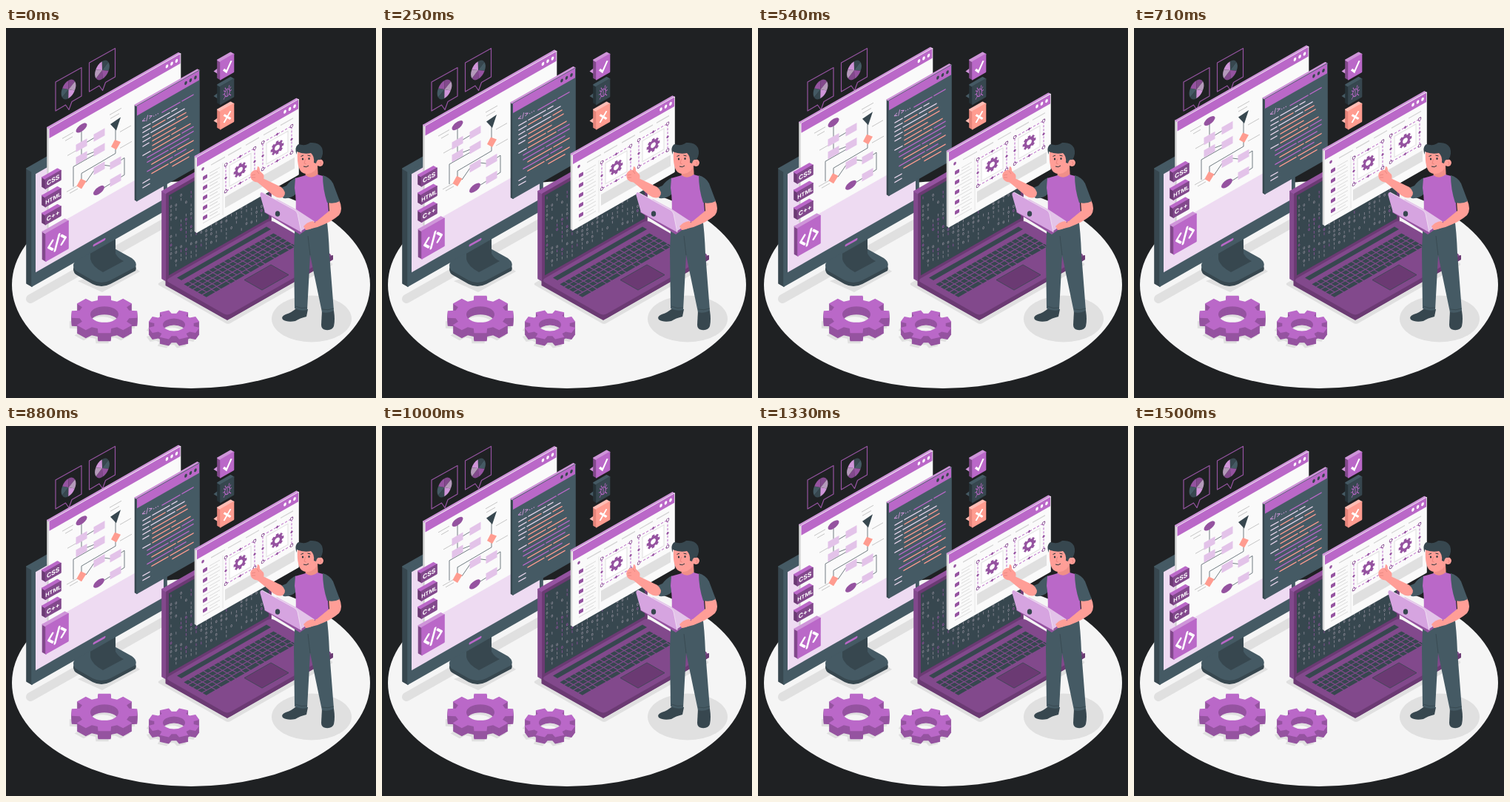
Write an HTML page that moves like this. It is 500 by 500 pixels and loops after 1.54 s.

```html
<!DOCTYPE html>
<html lang="en">
<head>
<meta charset="utf-8">
<title>Developer workspace</title>
<style>
  html, body { margin: 0; height: 100%; overflow: hidden; background: #1f2123; }
  svg { display: block; width: 100vw; height: 100vh; }
  text { font-family: Inter, "Open Sans", sans-serif; font-weight: 700; text-anchor: middle; }
</style>
</head>
<body>
<svg id="stage" viewBox="0 0 500 500"></svg>
<script>
const SLOPE = 0.57;
const PURPLE = '#ba68c8', PLUM = '#82498c', DEEP = '#6b3a73', MAUVE = '#9553a0', ORCHID = '#cf95d9';
const LILAC = '#e3c3e9', PALE = '#eedbf2', SLATE = '#455a64', NIGHT = '#37474f', INK = '#263238';
const SALMON = '#ff9c90', SKIN = '#ff9e97', GREY = '#e0e0e0', WHITE = '#fafafa';

const fill = (d, color, extra = '') => `<path d="${d}" fill="${color}" ${extra}/>`;
const line = (d, color, width = 1, extra = '') =>
  `<path d="${d}" fill="none" stroke="${color}" stroke-width="${width}" ${extra}/>`;
const rect = (x, y, w, h, color, extra = '') =>
  `<rect x="${x}" y="${y}" width="${w}" height="${h}" fill="${color}" ${extra}/>`;
const oval = (x, y, rx, ry, color, extra = '') =>
  `<ellipse cx="${x}" cy="${y}" rx="${rx}" ry="${ry}" fill="${color}" ${extra}/>`;
const text = (x, y, size, str, color = '#fff') =>
  `<text x="${x}" y="${y}" font-size="${size}" fill="${color}">${str}</text>`;
const wall = (x, y, body) => `<g transform="matrix(1 ${-SLOPE} 0 1 ${x} ${y})">${body}</g>`;
const floor = (x, y, body) => `<g transform="matrix(1 ${-SLOPE} 1 ${SLOPE} ${x} ${y})">${body}</g>`;
const float = body => `<g class="float">${body}</g>`;
const each = (list, draw) => list.map(draw).join('');
const range = n => [...Array(n).keys()];

// Upright slab: front face at (x, y), with its left side and top edge showing
function slab(x, y, w, h, depth, [front, side, top], content = '') {
  const rise = depth * SLOPE;
  const round = color => `stroke="${color}" stroke-width="1.6" stroke-linejoin="round"`;
  return fill(`M${x} ${y}l${-depth} ${-rise}v${h}l${depth} ${rise}z`, side, round(side)) +
    fill(`M${x} ${y}l${-depth} ${-rise}l${w} ${-w * SLOPE}l${depth} ${rise}z`, top, round(top)) +
    wall(x, y, rect(0, 0, w, h, front, round(front)) + content);
}

function gearPath(cx, cy, r, hole, squash, twist) {
  const points = [];
  for (let i = 0; i < 8; i++) {
    for (const [turn, size] of [[-.27, .77], [-.19, 1], [.19, 1], [.27, .77]]) {
      const a = i * Math.PI / 4 + turn + twist;
      points.push((cx + r * size * Math.cos(a)).toFixed(1) + ' ' + (cy + r * size * squash * Math.sin(a)).toFixed(1));
    }
  }
  const ry = hole * squash;
  return `M${points.join('L')}ZM${cx - hole} ${cy}a${hole} ${ry} 0 1 0 ${2 * hole} 0a${hole} ${ry} 0 1 0 ${-2 * hole} 0Z`;
}
const gear = (cx, cy, r, hole, color, squash = 1, twist = 0) =>
  fill(gearPath(cx, cy, r, hole, squash, twist), color, 'fill-rule="evenodd"');
function thickGear(cx, cy, r, hole, depth, twist) {
  const layer = (dx, dy, color) => gear(cx + dx, cy + dy, r, hole, color, SLOPE, twist);
  return layer(-3, depth + 3, GREY) + each(range(depth), i => layer(0, depth - i, MAUVE)) + layer(0, 0, PURPLE);
}

const dots = (right, y, color) => each([0, 6.5, 13], d => oval(right - d, y, 1.8, 2.3, color));

function chartBubble(x, y, spin) {
  const colors = [NIGHT, SLATE, MAUVE, PLUM, '#b59abb', ORCHID];
  const at = i => `${(12 * Math.cos(i * 1.047 + spin)).toFixed(1)} ${(12 * Math.sin(i * 1.047 + spin)).toFixed(1)}`;
  const pie = each(colors, (c, i) => fill(`M0 0L${at(i)}A12 12 0 0 1 ${at(i + 1)}Z`, c));
  return line(`M${x} ${y}l35 -19.500v38.500l-13 7.500l-4 11l-4.500 -6.500l-13.500 8z`, MAUVE, 1.2, 'stroke-linejoin="round"') +
    `<g transform="matrix(.82 -.47 0 1 ${x + 17.5} ${y + 10})">${pie}</g>`;
}

function flowWindow() {
  const strokes = [[76, 150, 15], [80, 153, 10], [83, 173, 15], [140, 118, 16], [141, 123, 12],
    [154, 141, 15], [154, 163, 16], [82, 222, 16], [86, 224, 11]];
  const boxes = [[102, 159], [126, 145], [102, 176], [126, 165], [126, 190], [148, 183], [148, 206]];
  return slab(58.5, 136.5, 177, 135, 2.5, [WHITE, '#d5d5d5', ORCHID],
      rect(0, 0, 177, 13, PURPLE) + dots(172, 6.5, '#fff')) +
    each(strokes, ([x, y, n]) => line(`M${x} ${y}l${n} ${-n * SLOPE}`, '#b8b8b8', .8)) +
    line('M102 140V176M109 155L119 149M109 172L119 168M148 135V154M148 164V170L102 197V206M91 215V188L119 172M133 186L141 187M154 180L160 176V199L133 216M108 209L119 193', NIGHT, .7) +
    each(boxes, ([x, y]) => wall(x, y, rect(-7.5, -5, 15, 10, LILAC))) +
    each([[102, 135.5], [125.5, 220]], ([x, y]) => wall(x, y, oval(0, 0, 7.5, 5, MAUVE))) +
    fill('M141 130.500L155 121L149 139z', NIGHT) +
    fill('M142 161L147 151.500L155 154.500L149 165zM95.500 214L101 204L108.500 207.500L102 218z', SALMON);
}

function codeWindow() {
  const ink = { p: PURPLE, w: '#e6d4ea', s: SALMON };
  const rows = ['p 34 58 p 61 76', 'w 8 18 w 21 44 w 47 54', 'w 8 18 s 21 38 w 41 64', 'w 8 16 w 19 51 s 54 66',
    'w 8 18 s 21 68', 'w 8 16 s 21 52', 's 21 44 s 47 72', 'w 8 18 s 21 58 p 61 76', 'p 14 76', 'p 14 42 p 45 70',
    's 20 52 s 55 76', 'p 14 48 p 51 66', 's 20 42 s 45 76', 'w 8 17 s 48 70', 'w 8 17'];
  const code = each(rows, (row, i) => row.replace(/(\w) (\d+) (\d+) ?/g,
    (_, c, from, to) => line(`M${from} ${28 + i * 6.2}H${to}`, ink[c], 1.5, 'stroke-linecap="round"')));
  return slab(177, 106, 84, 128, 2.5, [SLATE, NIGHT, ORCHID],
    rect(0, 0, 84, 13, PURPLE) + dots(79, 6.5, NIGHT) + text(18, 27, 8.5, '&lt;/&gt;…', ORCHID) + code);
}

function designWindow() {
  const panel = (x, y) => {
    const corners = [[0, 0], [39, 0], [0, 36], [39, 36]], mids = [[19.5, 0], [0, 18], [39, 18], [19.5, 36]];
    return `<g transform="translate(${x} ${y})">` +
      rect(5, 4, 29, 28, '#fff', `stroke="${GREY}"`) +
      rect(0, 0, 39, 36, 'none', `stroke="${PURPLE}" stroke-width="1" stroke-dasharray="3 2"`) +
      each(corners, ([u, v]) => oval(u, v, 1.8, 1.8, '#fff', `stroke="${PLUM}" stroke-width=".9"`)) +
      each(mids, ([u, v]) => fill(`M${u - 2} ${v}l2 -2l2 2l-2 2z`, MAUVE)) +
      gear(19.5, 18, 9, 3.4, MAUVE) + '</g>';
  };
  return slab(258, 175.5, 137, 101, 2.5, [WHITE, '#d5d5d5', ORCHID],
    rect(0, 0, 137, 12.5, PURPLE) + dots(132, 6, '#fff') +
    oval(8, 20, 1.8, 2, MAUVE) +
    line('M19 21H38M42 21H60M66 21H84M90 21H108M113 21H130', '#d2d2d2', 1.4) +
    line('M35 27V98', GREY, .7) +
    each(range(5), i => rect(8, 30.5 + i * 13.5, 6, 5, MAUVE, 'rx="1"') +
      line(`M17 ${31 + i * 13.5}H31m-14 4H28M8 ${39.5 + i * 13.5}H31`, '#d2d2d2', .8)) +
    rect(38, 75, 94, 15, GREY) + panel(39, 32) + panel(89, 30.5));
}

function tags() {
  const small = (y, label, size) => slab(53.5, y, 20.5, 12.5, 4.5, [PLUM, DEEP, PURPLE], text(10.2, 9.6, size, label));
  return small(205, 'CSS', 8.5) + small(229.5, 'HTML', 7.2) + small(253.5, 'C++', 8.5) +
    slab(54, 278.5, 30, 37, 4.5, [PURPLE, PLUM, ORCHID],
      line('M9 14.500L3.500 20.500L9 26.500M18 11L12 30M21 14.500L26.500 20.500L21 26.500', '#fff', 3, 'stroke-linecap="round" stroke-linejoin="round"'));
}

function statusIcons() {
  const icon = (y, front, side, top, mark) =>
    fill(`M280.500 ${y + 13}l8 -6v11z`, top) + slab(290, y, 17.5, 24, 4, [front, side, top], mark);
  const bug = line('M4 8L7 11M14 8L11 11M3 13H6M12 13H15M4 20L7 16M14 20L11 16M7 8L6 5M11 8L12 5M9 9V19', PURPLE, .9) +
    oval(9, 13.5, 3.4, 5, 'none', `stroke="${PURPLE}" stroke-width="1"`);
  return icon(45.5, PURPLE, PLUM, ORCHID, line('M4 13L8 18L14.500 7', '#fff', 2.6)) +
    icon(79, NIGHT, INK, SLATE, bug) +
    icon(112.5, SALMON, '#e5847a', '#ffbdb5', line('M4.500 7.500L13.500 18M13.500 7.500L4.500 18', '#fff', 2.4));
}

const monitor = () =>
  line('M33 366L222 259', GREY, 12, 'stroke-linecap="round"') +
  fill('M97 342L130 357L181 329L165 318z', GREY) +
  each([[4, NIGHT], [-1, SLATE]], ([dy, color]) =>
    fill('M91 322Q91 317 99 312L134 292L170 312Q178 318 175 324L141 342Q129 348 117 342L96 330Q91 327 91 322z', color, `transform="translate(0 ${dy})"`)) +
  fill('M114 300L148 282V305Q152 312 159 315L131 330Q116 322 114 312z', NIGHT) +
  slab(35, 194, 182, 155, 7, [SLATE, NIGHT, SLATE],
    rect(5, 6, 173, 133, PALE) + line('M84 147.500H98', PURPLE, 3, 'stroke-linecap="round"'));

function bigLaptop() {
  let seed = 7;
  const random = () => (seed = seed * 16807 % 2147483647) / 2147483647;
  const bits = each(range(19), c => each(range(17), r => {
    const u = 6 + c * 6.8, v = 9 + r * 5.8 + (c % 3) * 2, color = random() < .3 ? MAUVE : '#8f8c99';
    const kind = random();
    if (kind < .4) return '';
    return kind < .6 ? oval(u, v, .9, 1.6, 'none', `stroke="${color}" stroke-width=".7"`) : line(`M${u} ${v - 1.8}v3.600`, color, .7);
  }));
  const keys = each(range(5), i => line(`M8 ${20 + i * 6.3}H129`, NIGHT, 5.2, `stroke-dasharray="${i == 4 ? '12 1.1 5.700 1.100' : '5.700 1.100'}"`));
  return floor(204, 346, rect(0, 0, 143, 96, GREY, 'rx="3"')) +
    slab(217, 224, 141, 118, 6, [DEEP, PLUM, MAUVE], rect(3, 4, 135, 108, NIGHT) + bits) +
    floor(215, 347, rect(0, 0, 143, 84, DEEP, 'rx="5"')) +
    fill('M215.500 342v6L299 395L442 313V307z', DEEP) +
    floor(215, 341, rect(0, 0, 143, 84, PLUM, 'rx="5"') + rect(11, 5, 121, 6, NIGHT) + keys +
      rect(54, 53, 36, 24, DEEP, `stroke="${NIGHT}" stroke-width=".6"`));
}

const developer = () =>
  oval(413, 393, 54, 31.5, GREY) +
  // shoes
  fill('M392 379L408 380L406 390Q397 392 391 396Q380 398 374 394Q371 390 378 387Q387 384 392 379z', NIGHT) +
  fill('M427 382H443Q445 394 443 403Q441 409 432 408Q426 407 426 401z', NIGHT) +
  // trousers
  fill('M391 256H433Q436 276 437 305L443 382Q435 386 427 384L411 307L407 381Q398 383 390 379L389 300z', SLATE) +
  line('M411 307L408 281M391 376Q399 380 407 378M427 380Q435 382 443 379', NIGHT, .8) +
  // raised arm
  fill('M392 202Q384 206 379 213L365 219L375 230Q385 231 392 224z', SLATE) +
  fill('M347 203L372 215Q380 222 375 228Q370 232 361 226L338 207z', SKIN) +
  fill('M331 196Q335 191 339 192L340 187Q343 187 343 193L348 198Q350 204 345 208Q337 210 332 205Q329 200 331 196z', SKIN) +
  line('M332 199L337 198M332 202L337 202M339 193L342 197', '#e37f79', .7) +
  // body and head
  fill('M404 190L421 186L422 205Q412 210 405 203z', '#f08f88') +
  fill('M391 203L405 199Q412 205 421 198L432 201L437 260Q415 268 391 260Q393 233 390 216z', PURPLE) +
  fill('M394 166Q393 181 396 189Q399 198 408 197Q419 195 421 186Q428 189 429 182Q428 176 422 178L421 161z', SKIN) +
  fill('M393 171Q389 162 395 157Q405 160 411 155Q423 154 427 162Q430 170 425 178Q420 177 419 183L416 182Q417 173 412 169Q402 171 393 167z', NIGHT) +
  oval(401, 177, 1.1, 1.5, INK) + oval(409.5, 176.5, 1.1, 1.5, INK) +
  line('M398.500 173.500L402 172M407.500 172L411.500 173M402 187Q406 189 409 186', INK, 1) +
  line('M404.500 177L403 183L405.500 183.500M424 181Q427 181 425 185', '#e37f79', .8) +
  // near arm
  fill('M436 233L450 232Q456 245 450 253Q440 262 421 269L405 273L403 265L420 261L437 247z', SKIN) +
  fill('M428 199Q438 202 442 210L451 234Q444 238 434 236Q428 218 428 199z', SLATE) +
  // held laptop
  fill('M366 231L392 245L418 262L399 276L350 246z', LILAC) +
  fill('M349 249L397 279L418 264V261L398 275L350 246z', MAUVE) +
  fill('M346 222L390 246Q393 248 394 251L399 276L350 249L343.500 226Q343 222 346 222z', '#d6a4e0') +
  line('M346 222L390 246Q393 248 394 251L399 276', PALE, 1) +
  oval(367, 251, 3.2, 3.8, NIGHT) +
  fill('M402 268Q407 262 415 261L421 266Q414 272 405 273z', SKIN);

document.getElementById('stage').innerHTML =
  rect(0, 0, 500, 500, '#1f2123') + oval(250, 347, 242, 140, '#f5f5f5') +
  monitor() + chartBubble(67, 73, 1.6) + chartBubble(112.5, 47, -1.6) +
  float(flowWindow()) + bigLaptop() + float(codeWindow() + tags()) + statusIcons() +
  float(designWindow()) + developer() +
  thickGear(133, 387, 45, 19, 11, 0) + thickGear(227, 401, 35, 15, 9, Math.PI / 8);

const LOOP = 1540, PERIOD = 1500, LEAD = 40, LIFT = 10;
const floats = document.querySelectorAll('.float');

function frame() {
  const time = performance.now() % LOOP;
  const phase = (time + LEAD) % PERIOD / PERIOD;
  const lift = LIFT * (1 - Math.abs(2 * phase - 1));
  floats.forEach(g => g.setAttribute('transform', `translate(0 ${-lift.toFixed(2)})`));
  requestAnimationFrame(frame);
}
frame();
</script>
</body>
</html>
```
